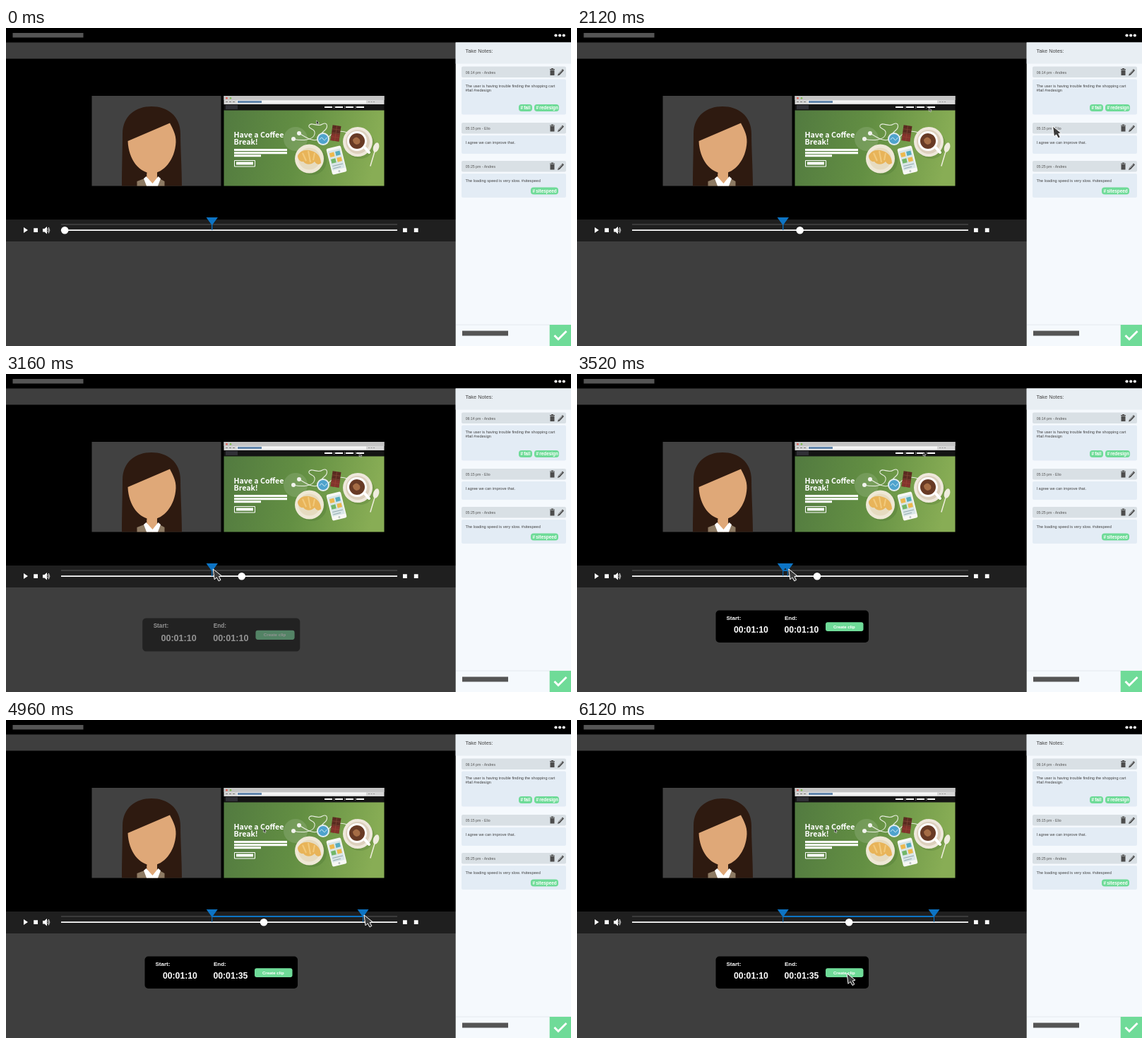
Animation, 800 px wide and 450 px high, one loop 6.72 s. Source, as an HTML page:

```html
<!DOCTYPE html>
<html lang="en">
<head>
<meta charset="utf-8">
<style>
  html, body { margin: 0; width: 100%; height: 100%; overflow: hidden; background: #3e3e3e; }
  svg { display: block; width: 100vw; height: 100vh; font-family: "Liberation Sans", Arial, sans-serif; }
  .meta { font-size: 5.2px; fill: #555; }
  .body { font-size: 5.6px; fill: #444; }
  .tag { font-size: 6.4px; font-weight: bold; fill: #fff; }
  .time { font-size: 12.2px; }
  .headline { font: bold 10.6px "Noto Sans CJK JP", "Noto Sans CJK SC", Lato, sans-serif; }
</style>
</head>
<body>
<svg viewBox="0 0 800 450">
  <defs>
    <linearGradient id="hero" x2="1" y2=".1">
      <stop offset="0" stop-color="#527a40"/><stop offset=".5" stop-color="#638f43"/><stop offset="1" stop-color="#88ad55"/>
    </linearGradient>
    <g id="marker" fill="#0d74c4"><path d="M-8 268H8L0 279z"/><path d="M-.5 277h1v9h-1z"/></g>
    <path id="arrow" d="M0 0 2 14.800 5 11.800 8 17 10.800 15.400 8.200 10.500 12 9.600z" fill="#3b3b3b" stroke="#fff" stroke-linejoin="round"/>
    <g id="tools" fill="#4d4d4d">
      <path d="M770 4.500h7v-1h-2v-1h-3v1h-2zM770.500 5h6v7.500h-6z"/>
      <path d="M781 13l1-3 6-6.500 2 2-6 6.500z"/><path d="M782.500 10.500l5-5.500" stroke="#d9e0e5" stroke-width=".8"/>
    </g>
  </defs>

  <rect width="800" height="450" fill="#3e3e3e"/>
  <path d="M0 0h800v20.500H0zM0 43.500h637v228H0z"/>
  <path d="M9.500 7h100v6.500h-100z" fill="#555"/>
  <g fill="#fff"><circle cx="778.500" cy="10.500" r="2.100"/><circle cx="784.200" cy="10.500" r="2.100"/><circle cx="789.800" cy="10.500" r="2.100"/></g>

  <!-- portrait -->
  <path d="M121.500 96h183v127.500h-183z" fill="#414141"/>
  <path d="M164 223.500C164 200 165 170 165 150 165 124 184 111 206 111s41 13 41 39c0 20 2 50 2 73.500z" fill="#2e1a10"/>
  <path d="M185.500 223.500v-6.500l13-5h17l9 5v6.500z" fill="#8d7a63"/>
  <path d="M199.500 198h14.500v14l4 3-10.500 8.500-11-8.500 3-3z" fill="#dfa878"/>
  <path d="M198.500 210l9 10 8-10 3.500 3-4 10.500h-16l-4-10.500z" fill="#fff"/>
  <path d="M199.500 206v5q8 7 14.500 0v-5z" fill="#dfa878"/>
  <path d="M172.500 160L232 134.500c4 8 9 16 8.500 27-1 25-18 44-33.500 44-18 0-33.500-19-34.500-45.500z" fill="#dfa878"/>

  <!-- browser -->
  <path d="M308.500 96h227v12h-227z" fill="#d6d6d6"/><path d="M308.500 96h227v6h-227z" fill="#c4c4c4"/>
  <circle cx="312.500" cy="99.300" r="1.300" fill="#e2574c"/><circle cx="318" cy="99.300" r="1.300" fill="#79b84a"/>
  <path d="M311 104.500h3M316 104.500h3M321 104.500h3" stroke="#777"/>
  <path d="M327 102.500h183v4H327z" fill="#f5f5f5"/><path d="M328 103h34v3h-34z" fill="#6387ad"/>
  <path d="M513 104.500h10" stroke="#999" stroke-dasharray="2 1.500"/>
  <path d="M308.500 108h227v9h-227z" fill="#141414"/><path d="M311 109h17v6h-17z" fill="#303036"/>
  <path d="M451 112h11M466 112h11M481 112h11M496 112h11" stroke="#fff" stroke-width="2"/>
  <path d="M464.500 110v4M479.500 110v4M494.500 110v4" stroke="#999" stroke-width=".6"/>
  <path d="M308.500 116.500h227v107h-227z" fill="url(#hero)"/>
  <g fill="#fff">
    <g class="headline"><text x="322.500" y="154.500">Have a Coffee</text><text x="322.500" y="165">Break!</text></g>
    <path d="M323 171h75v3h-75zM323 175.200h75v3h-75zM323 179.300h38v2.900h-38zM326 189.500h24v4h-24z"/>
    <path d="M323.500 187.500h29v8.500h-29z" fill="none" stroke="#fff"/>
  </g>
  <circle cx="410" cy="157" r="17" fill="#fff" opacity=".12"/>
  <g fill="none" stroke="#e9eee0" stroke-width="1.100">
    <path d="M407 157c12 3 28 2 30-7 2-8-10-7-8-12 3-6 12 3 19-2 8-4 8 5 3 9s-7 8-3 12"/>
    <path d="M415 149c10 6 20 13 28 8M456 155c8-10 20-10 27-7"/>
  </g>
  <g fill="#f1f3ed"><circle cx="407" cy="157" r="3"/><circle cx="415" cy="149" r="3"/></g>
  <circle cx="449" cy="157" r="9" fill="#e4edf0"/><circle cx="449" cy="157" r="7" fill="#4fa3cd"/>
  <path d="M444 158q3-5 5-1t5-2" fill="none" stroke="#c9e8f4"/>
  <g transform="rotate(8 467 149)"><path d="M461 138h12v22h-12z" fill="#5a2b20"/><path d="M467 138v22M461 143.500h12M461 149h12M461 154.500h12" stroke="#804635" stroke-width=".8"/><path d="M461 150h12v10h-12z" fill="#a93b36" opacity=".5"/></g>
  <ellipse cx="433" cy="188" rx="21" ry="20" fill="#365b27" opacity=".2"/>
  <circle cx="429.500" cy="185" r="20.500" fill="#efe8d6"/><circle cx="429.500" cy="185" r="15.500" fill="#e6dbc0"/>
  <path d="M413 181c3-8 12-10 20-7 8 2 13 9 13 17-4 4-7 1-9-2-6 6-13 4-16 0-4 1-8-3-8-8z" fill="#e8b459"/>
  <path d="M420 177l5 11M428 174l3 16M437 177l-2 10" stroke="#f2ca7d" stroke-width="2"/>
  <g transform="rotate(-14 468 187)">
    <rect x="457.500" y="168" width="21" height="38" rx="2.500" fill="#f8f8f5"/><path d="M459 172h18v28h-18z" fill="#d9e6e7"/>
    <path d="M460.500 175h6.500v6h-6.500z" fill="#edb94e"/><path d="M469 175h6.500v6H469z" fill="#58acbd"/><path d="M460.500 184h6.500v6h-6.500z" fill="#72b769"/><path d="M469 184h6.500v6H469z" fill="#edb94e"/><path d="M460.500 194h15M460.500 197.500h11" stroke="#94aab0"/>
    <circle cx="468" cy="203" r="1.500" fill="#bdc4c4"/>
  </g>
  <ellipse cx="501" cy="165" rx="21" ry="20" fill="#365b27" opacity=".2"/>
  <circle cx="498" cy="161" r="21" fill="#efe8dc"/><circle cx="498" cy="161" r="17" fill="#ddd0bd"/>
  <path d="M507 168l7 8" stroke="#fff" stroke-width="4" stroke-linecap="round"/>
  <circle cx="497" cy="160" r="14" fill="#fff"/><circle cx="497" cy="160" r="11" fill="#683a25"/>
  <path d="M491 158q5-7 10 0 2 6-5 7-5-2-5-7z" fill="#a56c45"/>
  <ellipse cx="524" cy="169" rx="4" ry="7" transform="rotate(18 524 169)" fill="#f0eddf"/><path d="M522 175l-6 20" stroke="#f0eddf" stroke-width="1.500" stroke-linecap="round"/>
  <path id="pointer" d="M0 0v5l1.300-1 1 2 1-.5-1-2h1.700z" fill="#222" stroke="#fff" stroke-width=".5"/>

  <!-- player bar -->
  <path d="M0 271.500h637V302H0z" fill="#1f1f1f"/>
  <path d="M78 278h476" stroke="#454545" stroke-width="1.500"/>
  <path d="M78 286.200h476" stroke="#fff" stroke-width="1.700"/>
  <path d="M25 282l6 4-6 4zM39.200 283.200h5.800v5.800h-5.800zM52 284h2.500l3.500-3v10.500l-3.500-3H52zM562 283.200h5.800v5.800H562zM577.800 283.200h5.800v5.800h-5.800z" fill="#fff"/>
  <path d="M59 283.500q2 2.700 0 5.400M60.300 282q3 4.200 0 8.400" fill="none" stroke="#fff" stroke-width=".9"/>
  <path id="range" stroke="#0d74c4" stroke-width="1.800"/>
  <use href="#marker" x="291.700"/>
  <use href="#marker" id="endMarker"/>
  <circle id="knob" cy="286.200" r="5.300" fill="#fff"/>

  <!-- notes -->
  <path d="M636.700 20.500H800V450H636.700z" fill="#f5f9fd"/><path d="M636.700 20.500H800v30H636.700z" fill="#e8eef3"/>
  <text x="650.500" y="35.300" font-size="7.400" fill="#444">Take Notes:</text>
  <g id="notes"></g>
  <path d="M637 420h163" stroke="#e4e9ee"/>
  <path d="M646 428.500h65v7h-65z" fill="#555"/>
  <path d="M769.700 420H800v30h-30.300z" fill="#6fdb98"/>
  <path d="M776.500 435l5.500 5.500 11.500-11.500" fill="none" stroke="#fff" stroke-width="3"/>

  <!-- clip panel -->
  <g id="panel" fill="#fff" font-weight="bold">
    <rect x="196.500" y="334.500" width="216.500" height="45.500" rx="5" fill="#000"/>
    <text x="211.500" y="348" font-size="8">Start:</text><text x="294" y="348" font-size="8">End:</text>
    <text class="time" x="222" y="366.200">00:01:10</text><text class="time" id="endTime" x="293.500" y="366.200"></text>
    <rect id="button" x="352" y="351.300" width="53.500" height="12.700" rx="3" fill="#6fdb98"/>
    <text x="363" y="359.500" font-size="6">Create clip</text>
  </g>
  <use href="#arrow" id="cursor"/>
</svg>
<script>
const $ = id => document.getElementById(id);
const LOOP = 6720, LAST = 6120, SEEK = 1000;

const notes = [
  { y: 54.5, h: 50, meta: '06:14 pm - Andres', lines: ['The user is having trouble finding the shopping cart', '#fail #redesign'], tags: [['fail', 726, 19], ['redesign', 748, 35]] },
  { y: 134, h: 26, meta: '05:15 pm - Elio', lines: ['I agree we can improve that.'], tags: [] },
  { y: 188, h: 34, meta: '05:25 pm - Andres', lines: ['The loading speed is very slow. #sitespeed'], tags: [['sitespeed', 743, 39]] },
];
$('notes').innerHTML = notes.map(({ y, h, meta, lines, tags }) => {
  const bottom = y + 18 + h;
  return `<rect x="645" y="${y}" width="148" height="15.5" rx="2" fill="#d9e0e5"/>
    <text class="meta" x="650.7" y="${y + 10.2}">${meta}</text><use href="#tools" y="${y}"/>
    <rect x="645" y="${y + 18}" width="148" height="${h}" rx="2" fill="#e3ecf5"/>` +
    lines.map((s, i) => `<text class="body" x="650.5" y="${y + 29.7 + i * 6}">${s}</text>`).join('') +
    tags.map(([s, x, w]) => `<rect x="${x}" y="${bottom - 14.5}" width="${w}" height="10" rx="4" fill="#6fdb98"/>
      <text class="tag" x="${x + 2.5}" y="${bottom - 7.2}">#</text><text class="tag" x="${x + 7.2}" y="${bottom - 7.2}">${s}</text>`).join('');
}).join('');

const progress = (t, from, to) => Math.min(1, Math.max(0, (t - from) / (to - from)));
const mix = (a, b, p) => a + (b - a) * p;
const inOut = p => p < .5 ? 4 * p ** 3 : 1 - 4 * (1 - p) ** 3;
const drag = t => 1 - (1 - progress(t, 3435, 4880) ** 2) ** 8.8;
const place = (id, x, y) => $(id).setAttribute('transform', `translate(${x} ${y})`);

// Each key is [time, x, y]; motion eases between neighbours.
function along(keys, t) {
  let i = 0;
  while (i < keys.length - 2 && t >= keys[i + 1][0]) i++;
  const [a, b] = [keys[i], keys[i + 1]];
  const p = inOut(progress(t, a[0], b[0]));
  return [mix(a[1], b[1], p), mix(a[2], b[2], p)];
}
const pointerKeys = [[1440, 339, 191], [2200, 499, 112.5], [2800, 501.5, 112], [3000, 501.5, 112], [3520, 490, 111], [4200, 470, 111], [4860, 364.5, 154]];
const cursorKeys = [[160, 600, 456], [860, 673.5, 139], [2180, 673.5, 139], [2840, 292.5, 276]];

function draw(t) {
  t = Math.min(t, LAST);
  const end = mix(291.7, 505.5, drag(t));

  $('knob').setAttribute('cx', t < SEEK ? 83.2 + Math.max(0, t - 160) * .0042 : 298.2 + (t - 1120) * .0174);
  place('pointer', ...(t < SEEK ? [439.5, 131] : along(pointerKeys, t)));

  $('range').setAttribute('d', `M291.7 278H${end}`);
  $('endMarker').setAttribute('x', end);
  $('endTime').textContent = '00:01:' + Math.floor(10 + 25 * drag(t - 60));

  const rest = (1 - progress(t, 3080, 3540)) ** 3;
  const scale = 1 + .055 * rest;
  $('panel').setAttribute('opacity', 1 - rest);
  $('panel').setAttribute('transform', `translate(304.75 ${357.25 + 21 * rest}) scale(${scale}) translate(-304.75 -357.25)`);
  $('button').setAttribute('opacity', t > 5840 && t < 6000 ? .88 : 1);

  let [x, y] = along(cursorKeys, t);
  if (t > 3000) {
    x = mix(end + 1.5, 382, inOut(progress(t, 4970, 5800)));
    y = mix(276, 358.5, inOut(progress(t, 4970, 5600)));
  }
  place('cursor', x, y);
}

const start = performance.now();
(function tick() {
  draw((performance.now() - start) % LOOP);
  requestAnimationFrame(tick);
})();
</script>
</body>
</html>
```
